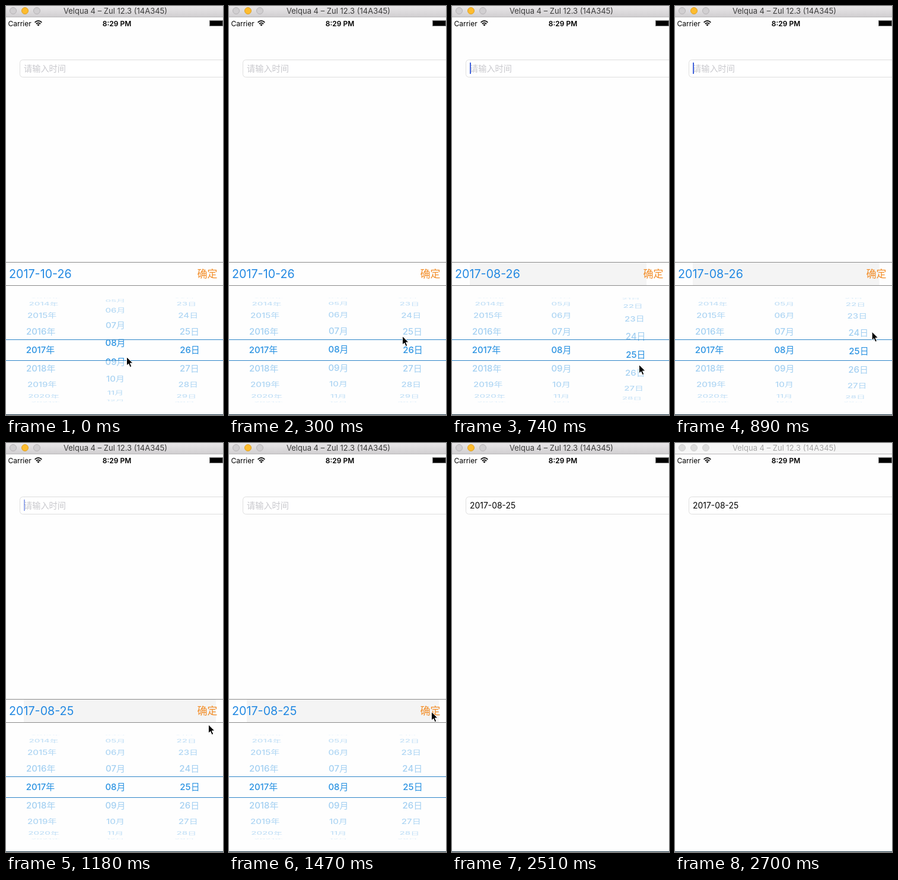
Animation of 366x687 px, one loop 2800 ms. Source, as an HTML page:

```html
<!DOCTYPE html>
<html lang="zh">
<head>
<meta charset="utf-8">
<title>Date picker</title>
<style>
  html, body { margin: 0; width: 100%; height: 100%; overflow: hidden; background: #fefefe; }
  svg { display: block; width: 366px; height: 687px; }
  text { font-family: Inter, "Noto Sans CJK SC", "Noto Sans CJK", sans-serif; }
  .wheel { font-size: 15px; font-weight: 500; text-anchor: middle; fill: #2b93e2; }
  .rule { fill: none; stroke: #8b8b8b; }
  .marker { stroke: #2f86c8; }
  #lights circle { fill: #d1cfd1; stroke: #b5b3b5; }
  #lights .amber { fill: #fdbc2f; stroke: #dfa023; }
  #title { font-size: 13px; fill: #3b3b3b; text-anchor: middle; }
  .inactive #bar { fill: #f6f6f6; }
  .inactive #title { fill: #a6a6a6; }
  .inactive #lights circle { fill: #dcdcdc; stroke: #cecece; }
</style>
</head>
<body>
<svg id="stage" viewBox="0 0 366 687">
  <defs>
    <linearGradient id="metal" x2="0" y2="1">
      <stop stop-color="#e9e7e9"/><stop offset="1" stop-color="#d1cfd1"/>
    </linearGradient>
    <clipPath id="outside"><path d="M0 490H366V560H0ZM0 596H366V666H0Z"/></clipPath>
    <clipPath id="inside"><path d="M0 561H366V595H0Z"/></clipPath>
  </defs>
  <rect width="366" height="687" fill="#fefefe"/>

  <rect id="bar" width="366" height="18" fill="url(#metal)"/>
  <path d="M0 18.5H366" stroke="#b9b7b9"/>
  <g id="lights">
    <circle cx="12" cy="8" r="5.5"/>
    <circle class="amber" cx="32" cy="8" r="5.5"/>
    <circle cx="52" cy="8" r="5.5"/>
  </g>
  <text id="title" x="184.5" y="13">Velqua 4 – Zul 12.3 (14A345)</text>

  <text x="3.5" y="33.5" font-size="12">Carrier</text>
  <g fill="none" stroke="#000" stroke-width="1.7">
    <path d="M48.6 27.6Q54.5 22.2 60.4 27.6M50.8 30Q54.5 26.7 58.2 30"/>
    <path d="M52.3 31.3Q54.5 29.6 56.7 31.3L54.5 33.8Z" fill="#000" stroke="none"/>
  </g>
  <text x="187" y="33.5" font-size="12" font-weight="600" text-anchor="middle">8:29 PM</text>
  <rect x="343.5" y="24.5" width="22" height="9" fill="#000" stroke="#777"/>

  <rect x="23.5" y="90.5" width="360" height="29" rx="5" fill="#fff" stroke="#dedede"/>
  <text id="field" x="30" y="109.7"></text>
  <rect id="caret" x="30" y="95" width="2" height="19" fill="#4263dc"/>

  <g id="panel">
    <rect y="430" width="366" height="257" fill="#fefefe"/>
    <rect id="shade" x="30" y="431" height="38" fill="#f4f4f4"/>
    <path class="rule" d="M0 430.5H366M0 469.5H366"/>
    <text id="date" x="5" y="457.3" font-size="19.7" fill="#2188e2"></text>
    <text x="322.6" y="456.3" font-size="17" fill="#f28c26">确定</text>
    <g id="dim" class="wheel" clip-path="url(#outside)"></g>
    <g id="bright" class="wheel" clip-path="url(#inside)"></g>
    <path class="marker" d="M0 560.5H366M0 595.5H366"/>
  </g>

  <path d="M0 686.5H366" stroke="#14303f"/>
  <path id="pointer" d="M.5 .5V15L3.8 12L6.2 17.6L8.8 16.5L6.4 11H11Z" stroke="#fff"/>
</svg>
<script>
const LOOP = 2800, STEP = LOOP / 19;
const CENTER = 578, RADIUS = 88, PITCH = 0.361;
const $ = id => document.getElementById(id);
const set = (node, attributes) => {
  for (const name in attributes) node.setAttribute(name, attributes[name]);
};

// Progress from 0 to 1 between two times: steady, slowing down, or soft at both ends.
const ramp = (t, from, to) => Math.min(1, Math.max(0, (t - from) / (to - from)));
const easeOut = (t, from, to) => 1 - (1 - ramp(t, from, to)) ** 2;
const easeBoth = (t, from, to) => {
  const p = ramp(t, from, to);
  return p * p * (3 - 2 * p);
};

function addText(parent, label) {
  const node = document.createElementNS("http://www.w3.org/2000/svg", "text");
  node.textContent = label;
  set(node, { dy: 5.4 });
  return parent.appendChild(node);
}

// Rows lie on a cylinder: sine gives height, cosine the vertical squeeze.
function makeWheel(x, first, last, unit) {
  const rows = [];
  for (let value = first; value <= last; value++) {
    const label = String(value).padStart(2, "0") + unit;
    rows.push({ value, dim: addText($("dim"), label), bright: addText($("bright"), label) });
  }
  return position => rows.forEach(({ value, dim, bright }) => {
    const angle = (value - position) * PITCH;
    const squeeze = Math.max(0, Math.cos(angle));
    const depth = 1000 / (1000 + RADIUS * (1 - squeeze));
    const px = 183 + (x - 183) * depth;
    const py = CENTER + RADIUS * Math.sin(angle);
    const transform = `translate(${px} ${py}) scale(1 ${squeeze})`;
    const visibility = squeeze > 0 ? "visible" : "hidden";
    set(bright, { transform, visibility });
    set(dim, { transform, visibility, opacity: 0.45 * squeeze ** 0.6 });
  });
}

const turnYear = makeWheel(58, 2013, 2021, "年");
const turnMonth = makeWheel(184.5, 4, 12, "月");
const turnDay = makeWheel(310, 20, 30, "日");
turnYear(2017);

function draw(time) {
  const t = Math.floor((time + 4) / STEP) * STEP;
  const drag = easeBoth(t, 300, 640);

  turnMonth(8 + 0.38 * (1 - easeOut(t, 0, 440)));
  turnDay(26 - 1.25 * drag + 0.25 * easeOut(t, 740, 1030));
  const month = t < 440 ? "10" : "08";
  const day = t < 1170 ? "26" : "25";
  $("date").textContent = `2017-${month}-${day}`;

  const x = 203 + 89 * easeOut(t, 0, 290) + 23 * easeOut(t, 300, 530) + 26 * easeOut(t, 740, 1100);
  const y = 589 - 35 * easeOut(t, 0, 290) + 48 * drag
    - 151 * easeOut(t, 740, 1445) + 229 * ramp(t, 1770, 2247);
  set($("pointer"), {
    transform: `translate(${x} ${y})`,
    visibility: t < 2500 ? "visible" : "hidden",
  });

  // The header tint reaches as far as the pointer's right edge.
  set($("shade"), { width: t < 440 ? 0 : x - 17 });
  set($("panel"), { transform: `translate(0 ${260 * easeOut(t, 1770, 1945)})` });
  set($("caret"), { opacity: ramp(t, 400, 589) - ramp(t, 960, 1440) });

  const filled = t > 1900;
  $("field").textContent = filled ? "2017-08-25" : "请输入时间";
  set($("field"), { "font-size": filled ? 13.9 : 14.2, fill: filled ? "#000" : "#c8c8cd" });
  $("stage").classList.toggle("inactive", time >= 2700);
}

const begin = performance.now();
function tick() {
  draw((performance.now() - begin) % LOOP);
  requestAnimationFrame(tick);
}
tick();
</script>
</body>
</html>
```
